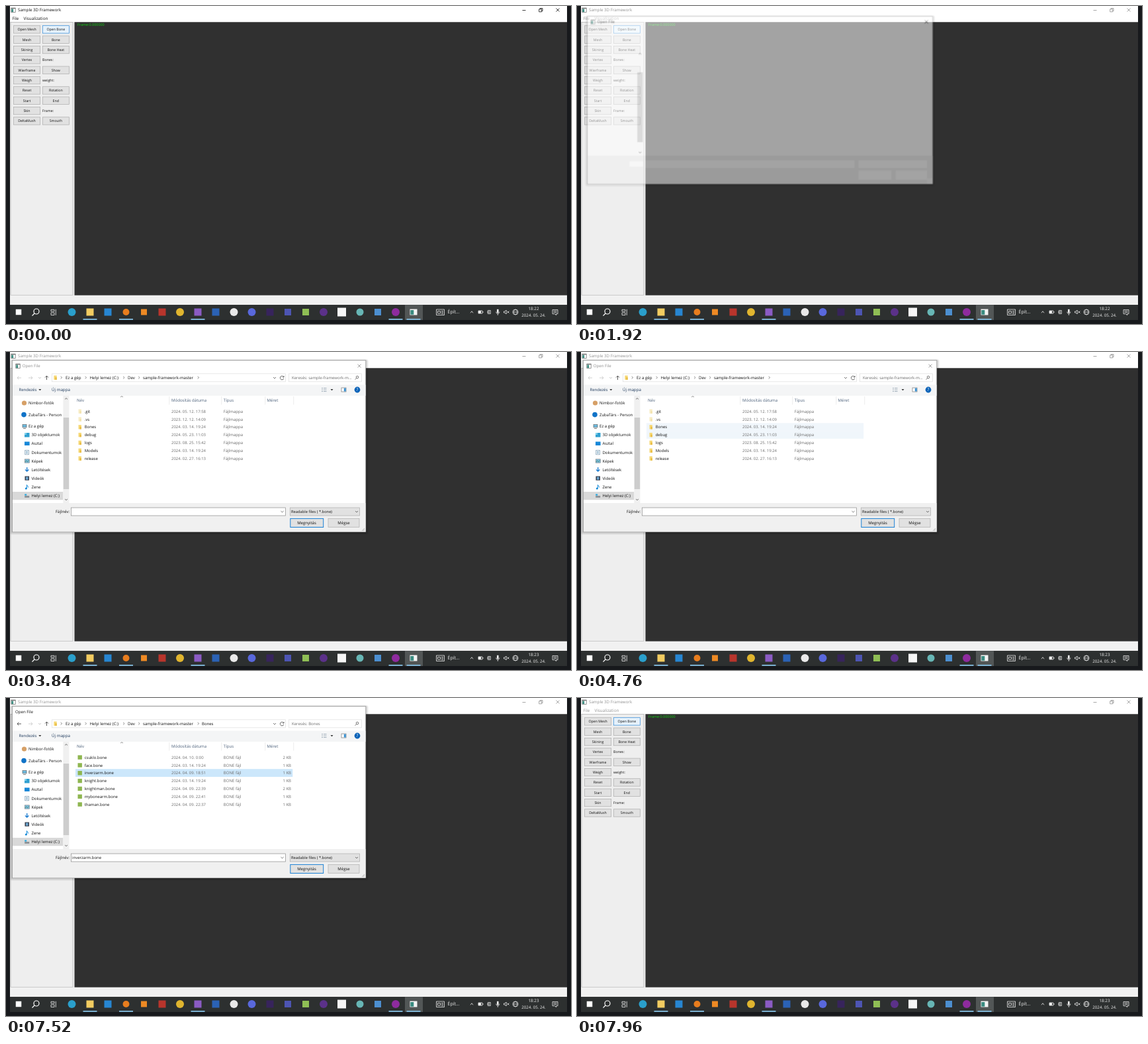
An HTML page that plays this animation: 854 by 480 pixels, repeating every 8000 ms.

```html
<!DOCTYPE html>
<html lang="hu">
<head>
<meta charset="utf-8">
<title>Sample 3D Framework</title>
<style>
html, body { margin: 0; width: 100%; height: 100%; overflow: hidden; background: #17191c; }
svg { display: block; width: 854px; height: 480px; }
text { font-family: "Open Sans", "Noto Sans", sans-serif; text-rendering: geometricPrecision; white-space: pre; }
[class] { animation: 8s step-end infinite; }
/* 0.5% of the loop is one 40 ms step */
.caption { color: #111; animation-name: caption; }
.minute1 { animation-name: minute1; }
.minute2 { animation-name: minute2; }
.dialog { transform-origin: 276.5px 142px; animation-name: dialog; }
.heading { color: #111; animation-name: heading; }
.list { animation-name: list; }
.loading { animation-name: loading; }
.loaded { animation-name: loaded; }
.folders { animation-name: folders; }
.bones { animation-name: bones; }
.hoverDebug { animation-name: hoverDebug; }
.hoverBones { animation-name: hoverBones; }
.pickBones { animation-name: pickBones; }
.hoverFile { animation-name: hoverFile; }
.pickFile { animation-name: pickFile; }
@keyframes caption { 0% { color: #111 } 23.5% { color: #929292 } }
@keyframes minute1 { 0% { opacity: 1 } 26% { opacity: 0 } }
@keyframes minute2 { 0% { opacity: 0 } 26% { opacity: 1 } }
@keyframes dialog {
  0% { opacity: 0; transform: scale(.95) }
  23.5% { opacity: .22; transform: scale(.96) }
  24% { opacity: .56; transform: scale(.977) }
  24.5% { opacity: .86; transform: scale(.992) }
  25% { opacity: 1; transform: none }
  97.5% { opacity: .6; transform: scale(.98) }
  98% { opacity: .25; transform: scale(.96) }
  98.5% { opacity: 0; transform: scale(.95) }
}
@keyframes heading { 0% { color: #111 } 38.5% { color: #8c8c8c } }
@keyframes list { 0% { opacity: 0 } 26% { opacity: 1 } }
@keyframes loading { 0% { opacity: 1 } 38.5% { opacity: 0 } }
@keyframes loaded { 0% { opacity: 0 } 38.5% { opacity: 1 } }
@keyframes folders { 0% { opacity: 1 } 76% { opacity: 0 } }
@keyframes bones { 0% { opacity: 0 } 76% { opacity: 1 } }
@keyframes hoverDebug { 0% { opacity: 0 } 58.5% { opacity: 1 } 60% { opacity: 0 } }
@keyframes hoverBones { 0% { opacity: 0 } 59.5% { opacity: 1 } }
@keyframes pickBones { 0% { opacity: 0 } 73% { opacity: 1 } }
@keyframes hoverFile { 0% { opacity: 0 } 78% { opacity: 1 } }
@keyframes pickFile { 0% { opacity: 0 } 86% { opacity: 1 } }
</style>
</head>
<body>
<svg id="stage" viewBox="0 0 854 480"></svg>
<script>
const box = (x, y, w, h, fill, line, width = .7) =>
  `<rect x="${x}" y="${y}" width="${w}" height="${h}" fill="${fill}"${line ? ` stroke="${line}" stroke-width="${width}"` : ''}/>`;
const dot = (x, y, r, fill) => `<circle cx="${x}" cy="${y}" r="${r}" fill="${fill}"/>`;
const path = (d, color, width = .8) => `<path d="${d}" fill="none" stroke="${color}" stroke-width="${width}"/>`;
const group = (name, ...parts) => `<g class="${name}">${parts.join('')}</g>`;
// y is the middle of the line
const text = (x, y, words, size = 6.1, fill = '#111', anchor = 'start') =>
  `<text x="${x}" y="${y + size * .35}" font-size="${size}" fill="${fill}" text-anchor="${anchor}">${words}</text>`;
const mid = (x, y, words, size, fill) => text(x, y, words, size, fill, 'middle');
const cross = (x, y, color) => path(`M${x - 2.5} ${y - 2.5}l5 5m0-5l-5 5`, color);
const chevron = (x, y, dir, color = '#555') =>
  path(`M${x - 2} ${y - dir}l2 ${2 * dir}l2 ${-2 * dir}`, color);
const appIcon = (x, y) => box(x - 3.2, y - 3, 6.4, 6.4, '#fff', '#666')
  + box(x - 2.7, y - 1.6, 2.8, 4.6, '#3f8f83') + box(x - 3.2, y - 3, 6.4, 1.2, '#777');
const folder = (x, y, pale) => box(x - 2.2, y - 3.2, 4.4, 6.4, pale ? '#f8edc6' : '#f6d978')
  + box(x - .2, y - .5, 2.4, 3.7, pale ? '#f3e3ae' : '#e9bd45');

function mainWindow() {
  const buttons = [
    ['Open Mesh', 'Open Bone'], ['Mesh', 'Bone'], ['Skining', 'Bone Heat'], ['Vertex', 'Bones:'],
    ['Wierframe', 'Show'], ['Weigh', 'weight:'], ['Reset', 'Rotation'], ['Start', 'End'],
    ['Skin', 'Frame:'], ['DeltaMush', 'Smouth'],
  ];
  const panel = buttons.map((row, i) => row.map((label, col) => {
    const x = 11.5 + 43.8 * col, y = 35.5 + 15.34 * i;
    if (label.endsWith(':')) return text(55, y, label, 5.3);
    const focus = label === 'Open Bone';
    return box(x, y - 5.8, 40.2, 11.4, focus ? '#e5f1fb' : '#e1e1e1', focus ? '#2b87d8' : '#adadad')
      + mid(x + 20, y, label, 5.25);
  }).join('')).join('');
  return box(6, 0, 842, 24, '#fff') + box(6, 24, 842, 413, '#f0f0f0')
    + box(7, 24.4, 94, 412, '#eee', '#b0b0b0') + box(103.5, 24.3, 744.5, 412.5, '#303030')
    + box(6, 436.8, 842, 14.4, '#f1f1f1') + panel
    + `<g font-family="sans-serif">${text(108, 27.6, 'Frame:0.000000', 5.45, '#12d012')}</g>`
    + appIcon(11, 6)
    + group('caption', text(18, 6, 'Sample 3D Framework', 6.2, 'currentColor'),
      text(9.5, 18.5, 'File', 6.2, 'currentColor'), text(26.5, 18.5, 'Visualization', 6.3, 'currentColor'),
      path('M780.5 6.5h5M805.7 4.8h4v4h-4zM807 4.8v-1.3h4v4h-1.3', 'currentColor'),
      cross(834, 6, 'currentColor'));
}

function taskbar() {
  const round = (x, fill, r = 6) => dot(x, 462, r, fill);
  const square = (x, fill, s = 11) => box(x - s / 2, 462 - s / 2, s, s, fill);
  const w = '#eee';
  const apps = [
    round(99.5, '#2a9fcb'), square(127, '#f2cc61'), square(154, '#2786d2'), round(181.5, '#e87d1e', 5),
    square(208.5, '#ee8a24', 9), square(236, '#b8352c'), round(263, '#e0b52f'), square(290, '#8b5bc4'),
    square(317, '#2b62b5'), round(344.5, '#e9e9e9'), round(371.5, '#5968dc'), square(399, '#37245c'),
    square(426, '#4d55b3', 10), square(453, '#8fbe55', 10), round(480, '#5b3189'), square(507.5, '#f6f6f6', 13),
    round(535, '#67b6b5', 5.5), square(562, '#4c8fd0', 10), round(589, '#8e2b9e', 6),
  ].join('');
  const running = [127, 181.5, 290, 589, 616].map(x => box(x - 10.5, 472, 21, 1.8, '#84bfe3')).join('');
  return box(6, 451.2, 842, 22.8, '#2d3030') + box(603, 451.2, 27, 22.8, '#525656')
    + square(19, '#fff', 8.5)
    + `<circle cx="46" cy="461" r="4" fill="none" stroke="#fff" stroke-width="1.2"/>` + path('M43 464l-3.5 3.6', '#fff', 1.3)
    + path('M68 458.3h5v2.7h-5zM68 463h5v3.5h-5zM75.3 457.8v9', w)
    + apps + running
    + box(610.5, 457.5, 11, 9, '#f4f4f4') + box(611.3, 459, 5, 6.8, '#398b80')
    + path('M650.5 458h12v8.5h-12zM652.5 460.5h4v3.5h-4zM658 460.5h3m-3 2h3m-3 2h3', w)
    + text(667.5, 462, 'Épít...', 7, w)
    + chevron(704, 462, -1.3, w)
    + path('M714 460h6v4h-6zM721 461v2M728.3 459.5h4v5h-4zM727 462h3.4m0-1.5v3', w)
    + box(714, 460, 4, 4, w) + box(742, 457.8, 2.6, 5.6, w) + path('M740.8 461.5c0 4 5 4 5 0M743.3 464.5v2.4', w)
    + path('M752.5 461h1.6l2-2v6l-2-2h-1.6zM757.5 460.5l3 3m0-3l-3 3', w)
    + `<circle cx="770" cy="462" r="4" fill="none" stroke="${w}" stroke-width=".8"/>` + path('M766 462h8M770 458c-3 2-3 6 0 8c3-2 3-6 0-8', w, .6)
    + group('minute1', mid(797.5, 457, '18:22', 6.3, w)) + group('minute2', mid(797.5, 457, '18:23', 6.3, w))
    + mid(797.5, 467.3, '2024. 05. 24.', 6.2, w)
    + path('M826 458.5h8v6.2h-2.5v2l-2-2h-3.5zM827.5 460.5h5m-5 2h5', w);
}

const rowY = i => 89.6 + 11.83 * i;
const highlight = (name, i, fill) => group(name, box(105, rowY(i) - 6, 328.2, 11.8, fill));

function fileRow(i, icon, name, date, type, size = '') {
  const grey = '#6d6d6d', y = rowY(i);
  return icon + text(118.7, y, name, 6) + text(250, y, date, 5.97, grey)
    + text(328.8, y, type, 6.05, grey) + text(431, y, size, 6, grey, 'end');
}

function folderView() {
  const rows = [
    ['.git', '2024. 05. 12. 17:58'], ['.vs', '2023. 12. 12. 14:09'], ['Bones', '2024. 03. 14. 19:24'],
    ['debug', '2024. 05. 23. 11:03'], ['logs', '2023. 08. 25. 15:42'], ['Models', '2024. 03. 14. 19:24'],
    ['release', '2024. 02. 27. 16:13'],
  ];
  return group('folders', highlight('hoverDebug', 3, '#f0f6fb'), highlight('hoverBones', 2, '#f0f6fb'),
    highlight('pickBones', 2, '#d5ebfa'),
    ...rows.map(([name, date], i) => fileRow(i, folder(111.7, rowY(i), name[0] === '.'), name, date, 'Fájlmappa')));
}

function boneView() {
  const rows = [
    ['csuklo', '04. 10. 0:00', 2], ['face', '03. 14. 19:24', 1], ['inverzarm', '04. 09. 18:51', 1],
    ['knight', '03. 14. 19:24', 1], ['knightman', '04. 09. 22:39', 2], ['mybonearm', '04. 09. 22:41', 1],
    ['thaman', '04. 09. 22:37', 1],
  ];
  return group('bones', highlight('hoverFile', 2, '#e7f3fd'), highlight('pickFile', 2, '#cce7fb'),
    ...rows.map(([name, date, kb], i) => fileRow(i, box(108.5, rowY(i) - 3.2, 6.4, 6.4, '#8eb650'),
      name + '.bone', '2024. ' + date, 'BONE fájl', kb + ' KB')));
}

function tree() {
  const items = ['3D objektumok', 'Asztal', 'Dokumentumok', 'Képek', 'Letöltések', 'Videók', 'Zene', 'Helyi lemez (C:)'];
  return box(10, 211, 76.4, 12.2, '#d9d9d9')
    + text(34, 77, 'Nimbor-fotók') + text(34, 94.6, 'ZubaTárs - Person', 6) + text(34, 112, 'Ez a gép')
    + items.map((name, i) => text(38.5, 125.2 + 13.13 * i, name, 6)).join('')
    + box(28, 122, 7.5, 6.5, '#2f9fd0') + box(28, 122, 3, 3, '#7cd0ec') + box(28, 135.4, 7.6, 5.6, '#1688d8')
    + box(86.4, 66, 9, 162, '#f0f0f0');
}

function treeIcons() {
  return dot(27.5, 77, 3.6, '#d6a067') + dot(27, 94.6, 3.8, '#1173c7')
    + box(25, 109.5, 6, 4.3, '#6bbbe0', '#666') + box(26, 115, 4, .8, '#666')
    + box(28.8, 148.3, 5.5, 6.5, '#fff', '#6c8fa8') + path('M30 150.5h3m-3 2h3', '#357aa5', .7)
    + box(28.3, 161.8, 7, 5.4, '#7dbfe3', '#888') + path('M28.6 166l2-2l2 1.5l2-1.8', '#387450')
    + path('M31.7 174v6.2m-2.7-2.7l2.7 2.7l2.7-2.7', '#1679cf', 1.3)
    + box(28.5, 187.5, 6.5, 6.2, '#353b49') + box(30, 188.5, 3.5, 4.2, '#6aa4cd')
    + path('M31.4 206v-5.5c.2 2 3 1.8 2.2 4', '#168bd8', 1) + dot(30.3, 206, 1.5, '#168bd8')
    + box(27, 212, 8.8, 10, '#d9d9d9') + box(28.2, 217, 7, 2.8, '#8b9196') + box(28.2, 214.4, 3, 2.2, '#25a7df');
}

function loadingFields() {
  return group('loading', box(74.5, 236.5, 21.5, 8.5, '#fff'), box(99, 235, 324, 12, '#fff'),
    box(429, 235, 106, 12, '#fff'), box(429, 250.5, 51, 14.5, '#fff'), box(486.5, 250.5, 48.5, 14.5, '#fff'),
    box(534.5, 262.5, 8.5, 8, '#fafafa'));
}

function loadedFields() {
  const arrow = (x, color, dir) => path(`M${x - 3 * dir} 39h${6 * dir}m${-2.3 * dir}-2.3l${2.3 * dir} 2.3l${-2.3 * dir} 2.3`, color);
  const crumbs = [[90, 'Ez a gép'], [126.5, 'Helyi lemez (C:)'], [184, 'Dev'], [207, 'sample-framework-master']];
  const steps = [83.5, 120.5, 178, 201, 290.5].map(x => path(`M${x - .8} 36.8l1.8 1.8l-1.8 1.8`, '#555', .7)).join('');
  return group('loaded', treeIcons(),
    box(69.5, 32.8, 353, 12, '#fff', '#dedede'), box(427.5, 32.8, 110, 12, '#fff', '#dedede'),
    group('folders', arrow(20, '#c4c4c4', -1), text(432, 38.7, 'Keresés: sample-framework-m...', 6.05, '#6d6d6d')),
    group('bones', arrow(20, '#333', -1), text(432, 38.7, 'Keresés: Bones', 6.05, '#6d6d6d'), text(296, 38.7, 'Bones', 6)),
    arrow(37, '#c4c4c4', 1), chevron(51, 39, .7, '#bbb'), path('M61.5 42v-6m-2.5 2.5l2.5-2.5l2.5 2.5', '#333'),
    folder(74.5, 38.7), steps, ...crumbs.map(([x, name]) => text(x, 38.7, name, 6.15)),
    chevron(406, 39, 1), path('M419.5 37.5a2.8 2.8 0 1 0 .3 2.5M420 36v2h-2', '#444'),
    `<circle cx="531" cy="38" r="1.8" fill="none" stroke="#444" stroke-width=".7"/>`, path('M529.7 39.5l-2 2', '#444'),
    text(19.5, 57.2, 'Rendezés', 6, '#1e395b'), `<path d="M49.3 56h4l-2 2.2z" fill="#333"/>`,
    text(69, 57.2, 'Új mappa', 6.2, '#1e395b'),
    path('M477 54.5h2m-2 2.5h2m-2 2.5h2m1-5h4.5m-4.5 2.5h4.5m-4.5 2.5h4.5', '#8f9fae'), `<path d="M490.5 56h4l-2 2.2z" fill="#333"/>`,
    text(96, 241, 'Fájlnév:', 6, '#111', 'end'), box(98.5, 235, 324, 12, '#fff', '#8a8a8a'), chevron(417.5, 241, .9),
    box(429.3, 235, 105.2, 12, '#e1e1e1', '#adadad'), text(431, 241, 'Readable files ( *.bone)', 5.75), chevron(530, 241, .9),
    box(429.8, 251.4, 49.9, 13.1, '#e1e1e1', '#1a80d4', 1), mid(454.5, 257.8, 'Megnyitás', 6),
    box(487, 251.3, 47, 13, '#e1e1e1', '#adadad'), mid(510.5, 257.8, 'Mégse', 6),
    path('M538 270l4-4m-2 4l2-2', '#aaa'),
    group('pickFile', text(100, 241, 'inverzarm.bone', 6)));
}

function dialog() {
  const shadow = [4, 3, 2, 1].map(s =>
    `<rect x="${9.5 - s}" y="${12.7 - s / 2}" width="${534.4 + 2 * s}" height="${259 + 1.5 * s}" rx="${s}" fill="#000" opacity=".05"/>`).join('');
  const columns = [[107, 'Név'], [250, 'Módosítás dátuma'], [328.8, 'Típus'], [394.5, 'Méret']];
  return group('dialog', shadow, box(9.6, 12.7, 534.2, 258.9, '#fff', '#8c8c8c'),
    box(10, 228, 533.5, 43.3, '#f0f0f0'),
    group('folders', appIcon(18, 21), group('heading', text(24.8, 21, 'Open File', 6.1, 'currentColor'), cross(534, 21, 'currentColor'))),
    group('bones', text(14, 21, 'Open File')),
    loadingFields(),
    group('list', box(10, 49.5, 533.5, 16.5, '#f4f5f6'),
      box(507, 54, 7, 6, '#fff', '#777'), box(510.8, 54.5, 3, 5, '#3d93d2'),
      dot(531, 57, 4.4, '#0b63b8'), mid(531, 57, '?', 6.5, '#fff'),
      tree(), ...columns.map(([x, name]) => text(x, 73, name, 6.1, '#4c607a')),
      ...[246.5, 325.5, 391.5, 434.5].map(x => box(x, 67, .7, 12.5, '#e3e3e3')), chevron(175, 67.4, -.7, '#777'),
      group('loading', box(29.3, 213.5, 5, 6.8, '#fff', '#999')),
      folderView(), boneView()),
    box(86.8, 99, 8.4, 108, '#cdcdcd'), chevron(91, 70.5, -.9), chevron(91, 222.8, .9),
    loadedFields());
}

document.getElementById('stage').innerHTML =
  box(0, 0, 854, 480, '#17191c') + mainWindow() + taskbar() + dialog();
</script>
</body>
</html>
```
